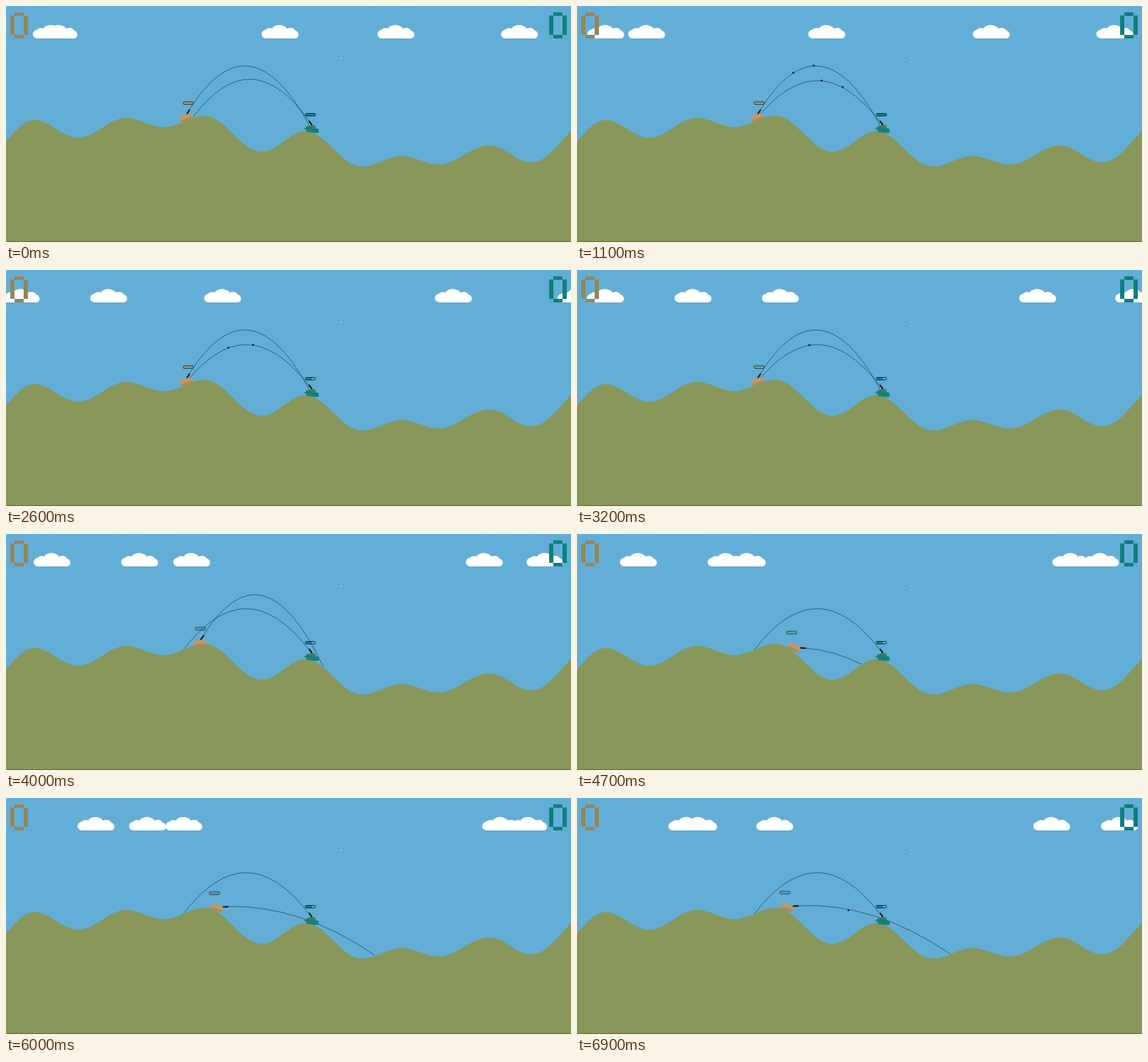
An HTML page without scripts for the animation above (7000 ms loop, 800x335 px).

```html
<!DOCTYPE html>
<html lang="en">
<head>
<meta charset="utf-8">
<title>Tank duel</title>
<style>
html, body { margin: 0; width: 100%; height: 100%; overflow: hidden; background: #63aed6; }
svg { display: block; width: 100vw; height: 100vh; }

.cloud { fill: #fff; animation: drift 7s linear infinite; }
.west { animation-name: bounce-west; }
.east { animation-name: bounce-east; }
@keyframes drift {
  from { transform: translateX(var(--from)); }
  to { transform: translateX(var(--to)); }
}
@keyframes bounce-west {
  0% { transform: translateX(49px); }
  30.8% { transform: translateX(-18.5px); }
  100% { transform: translateX(132.5px); }
}
@keyframes bounce-east {
  0% { transform: translateX(701px); }
  36.8% { transform: translateX(781.7px); }
  100% { transform: translateX(643px); }
}

/* Predicted flight paths */
.aim { fill: none; stroke: #1b3c55; stroke-width: .7; animation: 7s linear infinite; }
.tan-aim { animation-name: tan-aim; }
.teal-aim { animation-name: teal-aim; }
@keyframes tan-aim {
  0%, 52.9% { d: path("M259 148 Q344 12.4 429 168.6"); }
  58.6% { d: path("M286 143 Q371 8 456 195"); }
  64.3%, 70% { d: path("M323 162 Q363 164.8 403 185"); }
  82.9%, 86% { d: path("M314 154 Q418 151.7 522 223"); }
  98.5%, 100% { d: path("M313 153 Q420.5 147.5 528 221"); }
}
@keyframes teal-aim {
  0%, 3% { d: path("M429 163 Q347 47.8 265 157.5"); }
  8%, 100% { d: path("M429 164.6 Q340 47.4 251 164.6"); }
}

/* Tan tank: hull, barrel and health bar follow the hill */
.hull, .barrel, .bar { animation: 7s linear infinite; }
.hull { animation-name: hull; }
.barrel { animation-name: barrel; stroke: #0b0d10; stroke-width: 2; }
.bar { animation-name: bar; }
@keyframes hull {
  0%, 52.9% { transform: translate(255.5px, 158.5px) rotate(-18deg); }
  58.6% { transform: translate(281px, 154px) rotate(0deg); }
  64.3%, 70% { transform: translate(307.5px, 161.5px) rotate(29deg); }
  82.9%, 86% { transform: translate(298.7px, 156.3px) rotate(16deg); }
  98.5%, 100% { transform: translate(297.6px, 155.5px) rotate(15deg); }
}
@keyframes barrel {
  0%, 52.9% { transform: translate(260px, 147.3px) rotate(-57deg); }
  58.6% { transform: translate(287px, 143px) rotate(-50deg); }
  64.3%, 70% { transform: translate(324px, 162.2px) rotate(5deg); }
  82.9%, 86% { transform: translate(315px, 154.2px) rotate(-3deg); }
  98.5%, 100% { transform: translate(313.5px, 153px) rotate(-4deg); }
}
@keyframes bar {
  0%, 52.9% { transform: translate(251px, 136px); }
  58.6% { transform: translate(274px, 131.5px); }
  64.3%, 70% { transform: translate(297px, 138.3px); }
  82.9%, 86% { transform: translate(288.3px, 133.3px); }
  98.5%, 100% { transform: translate(287.3px, 132.5px); }
}

.health { animation: 7s step-end infinite; }
.tan-health { fill: #b39a6c; animation-name: tan-health; }
.teal-health { fill: #14837e; animation-name: teal-health; }
@keyframes tan-health {
  0% { width: 14px; }
  22.6% { width: 11.7px; }
  25% { width: 9.3px; }
  41.4% { width: 7px; }
  44.3% { width: 4.7px; }
  51.1% { width: 2.3px; }
}
@keyframes teal-health {
  0% { width: 14px; }
  24.7% { width: 11.7px; }
  27.5% { width: 9.3px; }
}

/* Shells: steady in x, gravity in y */
.shell { opacity: 0; fill: #0b0d10; animation: 7s linear var(--at) infinite; }
.tan-shell { animation-name: tan-x, tan-y; }
.teal-shell { animation-name: teal-x, teal-y; }
.flat-shell { animation-name: flat-x, flat-y; }
@keyframes tan-x {
  0% { cx: 259px; opacity: 1; }
  16.3% { cx: 429px; opacity: 1; }
  16.31%, 100% { cx: 429px; opacity: 0; }
}
@keyframes tan-y {
  0% { cy: 148px; animation-timing-function: cubic-bezier(.333, .667, .667, 1); }
  7.57% { cy: 84.5px; animation-timing-function: cubic-bezier(.333, 0, .667, .333); }
  16.3%, 100% { cy: 168px; }
}
@keyframes teal-x {
  0% { cx: 429px; opacity: 1; }
  13.6% { cx: 262px; opacity: 1; }
  13.61%, 100% { cx: 262px; opacity: 0; }
}
@keyframes teal-y {
  0% { cy: 164px; animation-timing-function: cubic-bezier(.333, .667, .667, 1); }
  7.22% { cy: 105.5px; animation-timing-function: cubic-bezier(.333, 0, .667, .333); }
  13.6%, 100% { cy: 150px; }
}
@keyframes flat-x {
  0% { cx: 313px; opacity: 1; }
  4.2% { cx: 420px; opacity: 1; }
  4.21%, 100% { cx: 420px; opacity: 0; }
}
@keyframes flat-y {
  0% { cy: 153px; animation-timing-function: cubic-bezier(.333, 0, .667, .333); }
  4.2%, 100% { cy: 167px; }
}
</style>
</head>
<body>
<svg viewBox="0 0 800 335">
  <defs>
    <path id="cloud" d="M6.5 46C-2 46-2 35 5.5 33.8C8 31 12 30.7 15 32C18 25.3 32 25.3 36 32C41 30 46 31 47 34.5C54 36 54 46 46.500 46Z"/>
    <path id="zero" d="M6 9h13v5H6zM0 13.500h6V41H0zM19 13.500h6V41h-6zM6 41h13v5H6z"/>
    <rect id="frame" width="14" height="3.600" rx="1" fill="none" stroke="#15242c" stroke-width=".9"/>
  </defs>

  <rect width="800" height="335" fill="#63aed6"/>

  <use href="#cloud" class="cloud" style="--from:38px;--to:257px"/>
  <use href="#cloud" class="cloud west"/>
  <use href="#cloud" class="cloud" style="--from:362px;--to:143px"/>
  <use href="#cloud" class="cloud" style="--from:526px;--to:745px"/>
  <use href="#cloud" class="cloud east"/>

  <use href="#zero" x="6" fill="#948659" role="img" aria-label="0"/>
  <use href="#zero" x="769" fill="#0d7f7d" role="img" aria-label="0"/>

  <path class="aim tan-aim" d="M259 148Q344 12.400 429 168.600"/>
  <path class="aim teal-aim" d="M429 163Q347 47.800 265 157.500"/>

  <path fill="#88965a" d="M0 192C14 177 26 162 40 162C63 162 79 187 102 187C127 187 145 159 170 159C189 159 204 172 223 172C244 172 260 156 281 156C311 156 332 207 362 207C385 207 401 178 424 178C453 178 475 228 504 228C524 228 540 213 560 213C579 213 594 225 613 225C639 225 658 198 684 198C706 198 722 222 744 222C765 222 782 196 800 177V335H0Z"/>
  <rect y="334" width="800" height="1" fill="#59664a"/>

  <path class="barrel" d="M-8 0H0"/>
  <g class="hull">
    <path fill="#c59764" d="M-10-3L-4-5L5-4.500L10.500-2L8.500 2H-9Z"/>
    <path fill="#a88a5d" d="M-9 1H9L7 4.500H-7Z"/>
  </g>
  <g class="bar">
    <rect class="health tan-health" width="14" height="3.600" rx="1"/>
    <use href="#frame"/>
  </g>

  <path d="M433.500 169.500L429 163" stroke="#0b0d10" stroke-width="2"/>
  <g transform="translate(432.500 174.500) rotate(8)">
    <path fill="#337f68" d="M-7-3L-1-5.500L5-5.500L6-1H-7Z"/>
    <path fill="#167f79" d="M-11 1L-7-2L10-1.500L11 4L5 5H-6L-7 2Z"/>
  </g>
  <g transform="translate(424 152.500)">
    <rect class="health teal-health" width="14" height="3.600" rx="1"/>
    <use href="#frame"/>
  </g>

  <circle class="shell tan-shell" r="1.300" style="--at:.59s"/>
  <circle class="shell tan-shell" r="1.300" style="--at:.785s"/>
  <circle class="shell teal-shell" r="1.300" style="--at:.63s"/>
  <circle class="shell teal-shell" r="1.300" style="--at:.8s"/>
  <circle class="shell teal-shell" r="1.300" style="--at:1.95s"/>
  <circle class="shell teal-shell" r="1.300" style="--at:2.15s"/>
  <circle class="shell teal-shell" r="1.300" style="--at:2.63s"/>
  <circle class="shell flat-shell" r="1.300" style="--at:6.705s"/>

  <path d="M473 71.500V75.500L474 74.800L475 76L475.300 74Z" fill="#fff" stroke="#456f87" stroke-width=".5"/>
</svg>
</body>
</html>
```
